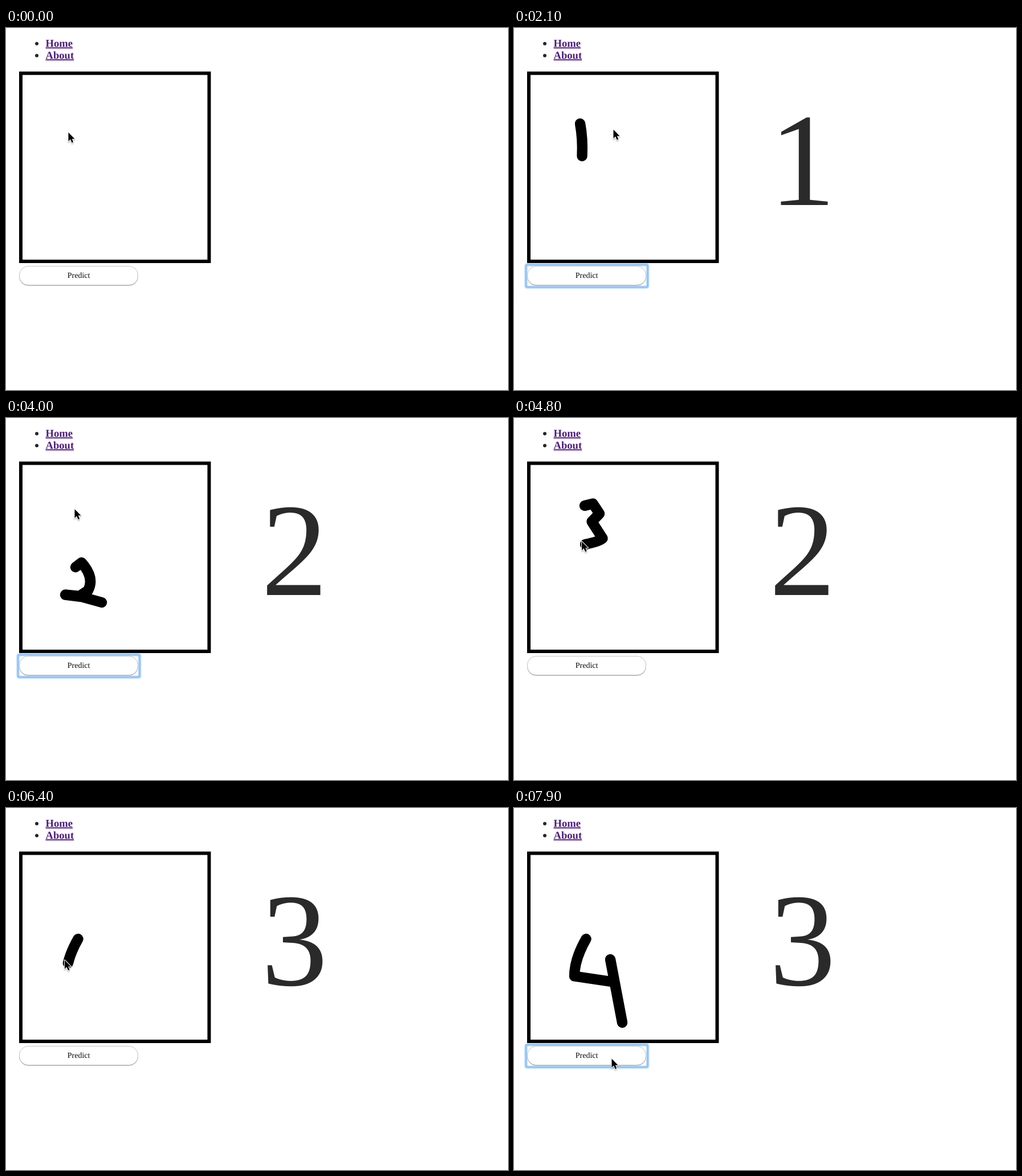
Write an HTML page that moves like this. It is 881 px wide and 636 px high and loops after 8 s.

```html
<!DOCTYPE html>
<html lang="en">
<head>
<meta charset="utf-8">
<title>Digit pad</title>
<style>
  html, body { margin: 0; width: 100%; height: 100%; overflow: hidden; background: #fff; }
  svg { display: block; width: 881px; height: 636px; font-family: "Liberation Serif", Times, serif; text-rendering: geometricPrecision; }
  .nav { font-size: 18.6px; font-weight: bold; fill: #4f1b80; text-decoration: underline; }
  .dot { fill: #262626; }
  .ink { fill: none; stroke: #000; stroke-width: 18.4; stroke-linecap: round; stroke-linejoin: round; }
  #result { font-size: 233px; fill: #2a2a2a; }
</style>
</head>
<body>
<svg viewBox="0 0 881 636">
  <defs>
    <filter id="soft" x="-50%" y="-50%" width="200%" height="200%"><feGaussianBlur stdDeviation="1"/></filter>
    <path id="arrow" d="M.5 .5V16L4 12.6L6.6 18.6L9.2 17.5L6.8 11.7H11.5Z"/>
    <rect id="halo" x="21" y="416" width="213.6" height="39.2" rx="2"/>
  </defs>

  <circle class="dot" cx="54" cy="27.5" r="3"/>
  <circle class="dot" cx="54" cy="48.5" r="3"/>
  <text class="nav" x="69.5" y="33">Home</text>
  <text class="nav" x="69.5" y="54">About</text>

  <rect x="26" y="79.5" width="330.5" height="330.5" fill="#fff" stroke="#000" stroke-width="6"/>
  <g id="pad"></g>

  <g id="ring" fill="none" stroke="#8fc3fa">
    <use href="#halo" stroke-width="4" filter="url(#soft)"/>
    <use href="#halo" stroke-width="2.6"/>
  </g>
  <rect x="23.5" y="419.2" width="208" height="33.3" rx="15.5" fill="#b4b4b4" stroke="#b4b4b4"/>
  <rect x="23.5" y="418.5" width="208" height="33" rx="15.5" fill="#fff" stroke="#c6c6c6"/>
  <text x="127.6" y="439" font-size="14" text-anchor="middle" fill="#0a0a0a">Predict</text>

  <text id="result" x="448" y="311"></text>

  <g id="cursor">
    <use href="#arrow" y="2" fill="#000" stroke="#000" stroke-width="1.5" opacity=".3" filter="url(#soft)"/>
    <use href="#arrow" fill="#000" stroke="#fff" stroke-width="2" stroke-linejoin="round" paint-order="stroke"/>
  </g>
</svg>
<script>
const LOOP = 8000, STEP = 100, HOP = 200;
const $ = id => document.getElementById(id);

// Each round: draw the strokes, click the button, drift to a resting place, see the answer.
const rounds = [
  { strokes: [{ down: 200, up: 500, d: 'M116 168Q121 195 119.5 225' }],
    click: { t: 1100, x: 140, y: 426 }, rest: { t: 1800, x: 174, y: 178 }, answer: 2000 },
  { strokes: [{ down: 2400, up: 2600, d: 'M122 262L132.5 254Q156 280 144 303L129 313L104 310.5L132 314L168 324' }],
    click: { t: 3200, x: 149, y: 431 }, rest: { t: 4100, x: 119, y: 150 }, answer: 4000 },
  { strokes: [{ down: 4300, up: 4800, d: 'M124 154L138.5 150.5L150 168L136.5 182L155.5 211.5Q150 217 125 222' }],
    click: { t: 5200, x: 167, y: 440 }, rest: { t: 5800, x: 167, y: 283 }, answer: 6100 },
  { strokes: [{ down: 6200, up: 6800, d: 'M126.5 230Q106 266 106 295.5L173.5 305.5' },
              { down: 7000, up: 7300, d: 'M169 266L190 377' }],
    click: { t: 7800, x: 171, y: 440 }, rest: { t: LOOP, x: 171, y: 440 }, answer: LOOP }
];

const strokes = [];
const stops = [{ t: 0, x: 109, y: 183 }];

// The ink lies a little below and right of the cursor's tip.
function tip({ el, len, down, up }, t) {
  const p = el.getPointAtLength(len * (t - down) / (up - down));
  return { t, x: p.x - 6.5, y: p.y - 5.5 };
}

rounds.forEach((round, i) => {
  const next = rounds[i + 1];
  round.end = next ? next.strokes[0].down : LOOP;
  for (const s of round.strokes) {
    s.el = document.createElementNS('http://www.w3.org/2000/svg', 'path');
    s.el.setAttribute('class', 'ink');
    s.el.setAttribute('d', s.d);
    $('pad').append(s.el);
    s.len = s.el.getTotalLength();
    s.end = round.end;
    strokes.push(s);
    stops.push({ ...stops.at(-1), t: s.down - HOP }, tip(s, s.down), tip(s, s.up));
  }
  stops.push(round.click, round.rest);
});

const within = (t, a, b) => t >= a && t < b;
const ease = k => k * k * (3 - 2 * k);

function cursorAt(t) {
  const pen = strokes.find(s => within(t, s.down, s.up));
  if (pen) return tip(pen, t);
  const i = stops.findIndex(s => s.t > t);
  const a = stops[i - 1], b = stops[i];
  const k = ease((t - a.t) / (b.t - a.t));
  return { x: a.x + (b.x - a.x) * k, y: a.y + (b.y - a.y) * k };
}

function draw(t) {
  for (const { el, len, down, up, end } of strokes) {
    const k = Math.min(1, Math.max(0.01, (t - down) / (up - down)));
    el.style.display = within(t, down, end) ? '' : 'none';
    el.style.strokeDasharray = k < 1 ? `${len * k} ${len * 2}` : 'none';
  }
  const focused = rounds.some(r => within(t, r.click.t, r.end));
  $('ring').style.display = focused ? '' : 'none';
  $('result').textContent = rounds.filter(r => t >= r.answer).length || '';
  const { x, y } = cursorAt(t);
  $('cursor').setAttribute('transform', `translate(${x} ${y})`);
}

const start = performance.now();
function tick() {
  const t = (performance.now() - start) % LOOP;
  draw(Math.floor(t / STEP) * STEP);
  requestAnimationFrame(tick);
}
tick();
</script>
</body>
</html>
```
